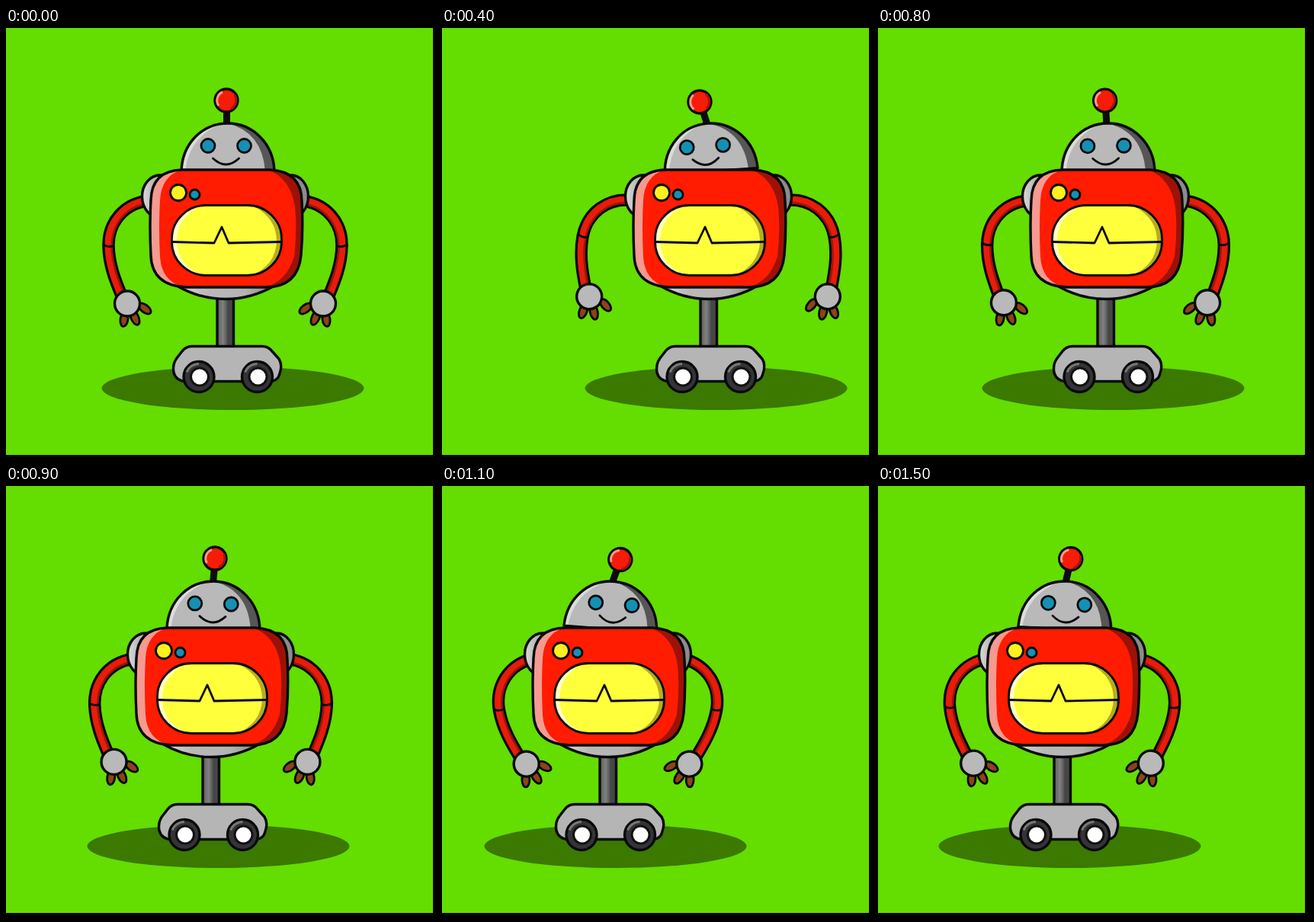
Recreate the animation shown at these times as an HTML page. Size 564x564 px, loop 1.6 s.

```html
<!DOCTYPE html>
<html lang="en">
<head>
<meta charset="utf-8">
<title>Rolling robot</title>
<style>
  html, body { margin: 0; width: 100%; height: 100%; overflow: hidden; background: #000; }
  svg { display: block; width: 100%; height: 100%; }
  .ink { stroke: #080808; stroke-width: 3.4; stroke-linejoin: round; stroke-linecap: round; }
  .thin { stroke-width: 2.8; }
  .line { fill: none; }
</style>
</head>
<body>
<svg viewBox="0 0 564 564">
  <defs>
    <linearGradient id="metal">
      <stop offset="0" stop-color="#dcdcdc"/><stop offset=".3" stop-color="#b9b9b9"/>
      <stop offset=".7" stop-color="#b4b4b4"/><stop offset="1" stop-color="#858585"/>
    </linearGradient>
    <linearGradient id="steel">
      <stop offset=".1" stop-color="#666"/><stop offset=".35" stop-color="#808080"/>
      <stop offset=".55" stop-color="#606060"/><stop offset=".65" stop-color="#464646"/>
    </linearGradient>
    <linearGradient id="bodyEdge">
      <stop offset=".5" stop-color="#f59a90"/><stop offset=".5" stop-color="#9c1208"/>
    </linearGradient>
    <linearGradient id="screenEdge">
      <stop offset=".5" stop-color="#ffffc4"/><stop offset=".5" stop-color="#b5ae20"/>
    </linearGradient>
    <linearGradient id="headEdge">
      <stop offset=".5" stop-color="#dcdcdc"/><stop offset=".5" stop-color="#565656"/>
    </linearGradient>
    <path id="torso" d="M231 186H346Q388 188 388 228Q390 262 387 298Q383 340 340 340H237Q191 338 190 298Q188 262 190 226Q191 187 231 186Z"/>
    <path id="dome" d="M230 188C231 152 257 125 291 125C324 125 351 152 352 188Z"/>
    <path id="chassis" d="M244 417.500H336Q344 417.500 349 424L358 434Q363 442 359 453Q357 463 346 463.500H236Q223 463 220 452Q218 441 224 433L231 424Q236 417.500 244 417.500Z"/>
    <rect id="screen" x="217.500" y="232.500" width="144" height="92" rx="45" ry="44"/>
    <clipPath id="inTorso"><use href="#torso"/></clipPath>
    <clipPath id="inDome"><use href="#dome"/></clipPath>
    <clipPath id="inScreen"><use href="#screen"/></clipPath>

    <g id="arm">
      <g class="ink thin" fill="#8f4218">
        <ellipse cx="155" cy="382" rx="5" ry="9.500" transform="rotate(8 155 382)"/>
        <ellipse cx="182" cy="368" rx="5" ry="9.500" transform="rotate(-52 182 368)"/>
        <ellipse cx="169" cy="380" rx="5" ry="10" transform="rotate(-24 169 380)"/>
      </g>
      <path id="limb" class="line" d="M192 226C154 228 134 256 134.500 286C135 312 145 335 152 352" stroke="#080808" stroke-width="16.500"/>
      <path class="line" d="M192 226C154 228 134 256 134.500 286C135 312 145 335 152 352" stroke="#e81c0a" stroke-width="10"/>
      <path class="line" d="M188 230C157 233 139 258 138.500 286C139 311 148 333 155 350" stroke="#9c140a" stroke-width="2.500"/>
      <path class="ink thin line" d="M128 284.500Q134 288 141 286"/>
      <circle class="ink" cx="159" cy="361.500" r="16.500" fill="#b9b9b9"/>
    </g>
    <g id="wheel">
      <circle class="ink" r="20" fill="#343438"/>
      <path class="line" d="M-16-6A17 17 0 0 1 0-17" stroke="#777" stroke-width="3"/>
      <circle cx="1" r="13" fill="#111"/>
      <circle cx="1" r="10" fill="#fff"/>
    </g>
  </defs>

  <rect width="564" height="564"/>
  <rect width="560" height="560" fill="#64dd00"/>

  <g id="robot">
    <ellipse cx="297.500" cy="472.500" rx="172" ry="28.500" fill="#3b7900"/>

    <rect class="ink" x="277" y="345" width="21.500" height="75" fill="url(#steel)"/>
    <use href="#chassis" class="ink" fill="#b5b5b5"/>
    <use href="#wheel" x="253" y="457.500"/>
    <use href="#wheel" x="329.500" y="457.500"/>

    <g id="leftArm"><use href="#arm"/></g>
    <g id="rightArm"><use href="#arm" transform="translate(575) scale(-1 1)"/></g>
    <ellipse class="ink" cx="202" cy="221" rx="23.500" ry="28" fill="url(#metal)"/>
    <ellipse class="ink" cx="374" cy="221" rx="22.500" ry="28" fill="#8c8c8c"/>

    <g id="head">
      <g id="antenna">
        <rect x="285" y="104" width="9" height="22" fill="#0c0c0c"/>
        <circle class="ink" cx="289" cy="95" r="15" fill="#f51c08"/>
        <path class="line" d="M279 102A12 12 0 0 1 284 84" stroke="#f79a90" stroke-width="3"/>
        <path class="line" d="M295 106A13 13 0 0 0 300 88" stroke="#a8140a" stroke-width="3"/>
      </g>
      <g clip-path="url(#inDome)">
        <use href="#dome" fill="url(#headEdge)"/>
        <path d="M235 190Q239 142 286 124Q337 134 340 190Z" fill="#b9b9b9"/>
      </g>
      <use href="#dome" class="ink line"/>
      <g id="face" class="ink thin">
        <circle cx="265" cy="154.500" r="9" fill="#1590b5"/>
        <circle cx="312.500" cy="154.500" r="9" fill="#1590b5"/>
        <path class="line" d="M271.500 171Q288.500 187 305.500 171"/>
      </g>
    </g>

    <path class="ink" d="M224 338Q254 355.500 288 355.500Q322 355.500 352 338Z" fill="url(#metal)"/>
    <g clip-path="url(#inTorso)">
      <use href="#torso" fill="url(#bodyEdge)"/>
      <path d="M239 184H338Q373 194 379 235Q382 265 378 300Q366 338 330 342H241Q204 336 202 300Q200 262 202 226Q204 189 239 184Z" fill="#ff1c00"/>
    </g>
    <use href="#torso" class="ink line"/>

    <g clip-path="url(#inScreen)">
      <use href="#screen" fill="url(#screenEdge)"/>
      <path d="M262 231H318Q354 245 355 279Q354 313 318 326H262Q225 314 224 279Q225 244 262 231Z" fill="#ffff3c"/>
    </g>
    <use href="#screen" class="ink thin line"/>
    <path class="ink thin line" d="M218 280.500L273 282L283 261L292 282L361 280.500"/>
    <circle class="ink thin" cx="226" cy="216" r="10.500" fill="#fff01e"/>
    <circle class="ink thin" cx="247.500" cy="218.500" r="6.500" fill="#1590b5"/>
  </g>
</svg>
<script>
  const STEP = 100;
  // Sideways position of the robot at each step of the loop
  const drift = [0, 16, 32, 48, 62, 70, 63, 40, 11, -19, -47, -70, -77, -72, -61, -46];
  const part = id => document.getElementById(id);
  const move = (id, transform) => part(id).setAttribute("transform", transform);

  function draw() {
    const x = drift[Math.floor(performance.now() / STEP) % drift.length];
    // The arms spread on the right and close only well left of the middle
    const swing = x > 0 ? 0.19 * x : 0.16 * Math.min(0, x + 15);
    move("robot", `translate(${x})`);
    move("leftArm", `rotate(${swing} 190 222)`);
    move("rightArm", `rotate(${-swing} 385 222)`);
    move("head", `rotate(${-0.065 * x} 291 185)`);
    move("face", `translate(${-0.06 * x})`);
    move("antenna", `rotate(${-0.22 * x} 290 124)`);
    requestAnimationFrame(draw);
  }
  draw();
</script>
</body>
</html>
```
